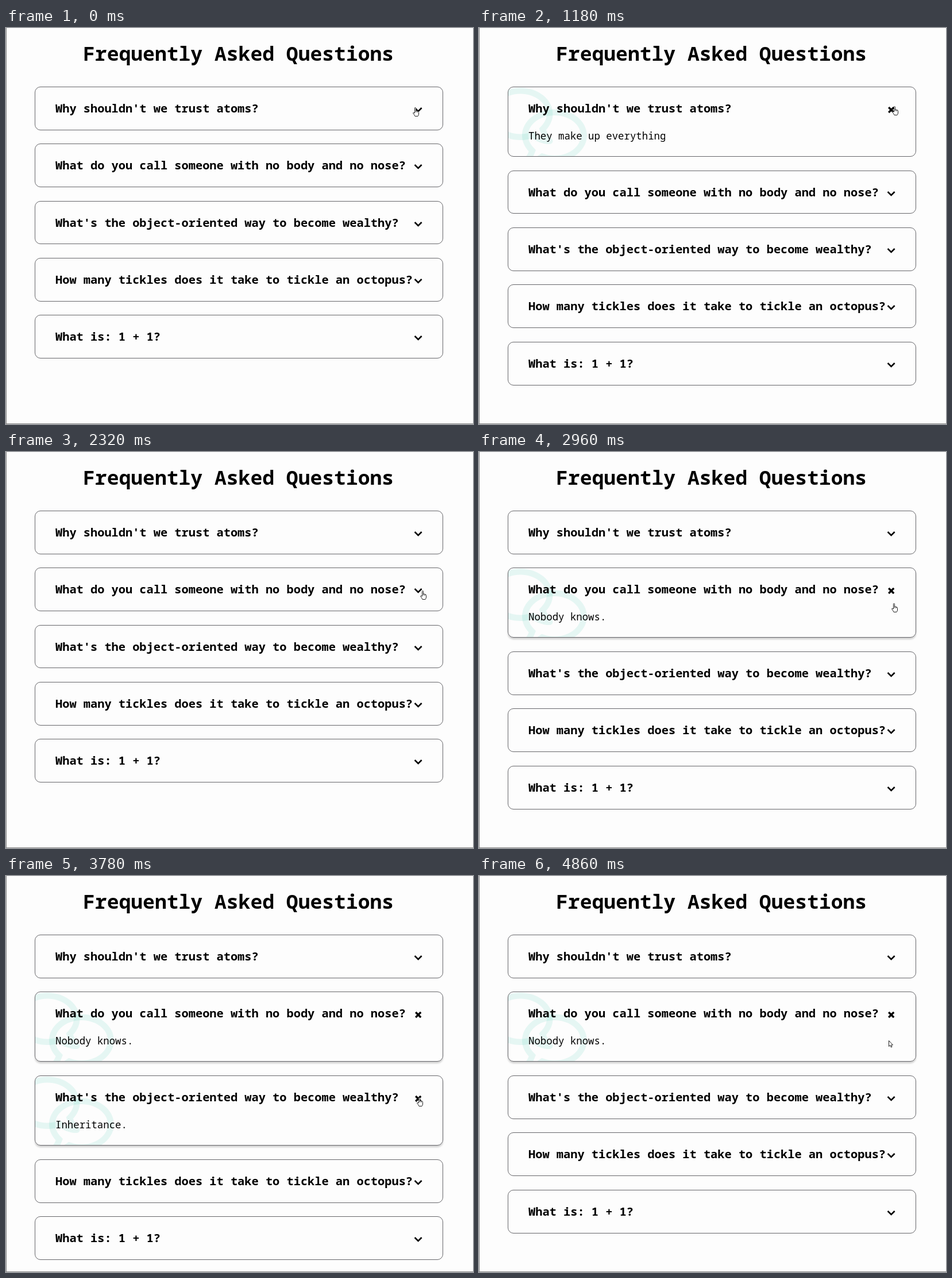
These frames come from a looping animation (813 by 689 pixels, 4.96 s). An HTML page:

```html
<!DOCTYPE html>
<html lang="en">
<head>
<meta charset="utf-8">
<title>Frequently Asked Questions</title>
<style>
  html, body { margin: 0; width: 100%; height: 100%; overflow: hidden; background: #fdfdfd; }
  #stage { position: absolute; inset: 0; box-sizing: border-box; border: solid #858585; border-width: 0 0 1px 1px; }
  svg { position: absolute; overflow: visible; }
  text { font-family: "Noto Sans Mono", monospace; white-space: pre; }
  .title { font-size: 34.7px; font-weight: 700; }
  .question { font-size: 20.33px; font-weight: 700; }
  .answer { font-size: 17.35px; }
  .card { position: absolute; left: 50px; width: 711px; box-sizing: border-box;
    border: 1px solid #66666a; border-radius: 10px; overflow: hidden; }
  .card svg { left: -1px; top: -1px; }
  .bubbles { fill: #1abc9c; opacity: .1; }
  .icon { fill: none; stroke: #000; }
  #cursor { left: 0; top: 0; fill: #fff; stroke: #222; stroke-width: 1; stroke-linejoin: round; }
</style>
</head>
<body>
<div id="stage"></div>
<svg width="813" height="80" style="left:0;top:0"><text class="title" x="134" y="57">Frequently Asked Questions</text></svg>
<div id="cards"></div>
<svg id="cursor" width="20" height="20">
  <path id="hand" d="M3.5 10V1.5Q3.5 .5 4.5 .5T5.5 1.5V6Q7.9 5.3 8 6.8Q10.4 6.3 10.5 8.5V12Q10.2 14 9 15.5H4Q3 13 .6 10Q.9 8 3.5 10ZM5.5 6V8.5M8 6.8V9"/>
  <path id="arrow" d="M.5 .5V10.5L2.8 8.5 4.4 12 6 11.3 4.5 8H7.5Z"/>
</svg>
<script>
const LOOP = 4960, FADE = 140;
const TOP = 101.8, CLOSED = 75.8, PITCH = 99.4, EXTRA = 46.4;

// open: the time span in which a card shows its answer
const items = [
  { question: "Why shouldn't we trust atoms?", answer: "They make up everything", open: [1180, 1870] },
  { question: "What do you call someone with no body and no nose?", answer: "Nobody knows.", open: [2500, LOOP] },
  { question: "What's the object-oriented way to become wealthy?", answer: "Inheritance.", open: [3510, 4670] },
  { question: "How many tickles does it take to tickle an octopus?" },
  { question: "What is: 1 + 1?" }
];

const BUBBLE = "M256 32C114.6 32 0 125.1 0 240c0 47.6 19.9 91.2 52.9 126.3C38 405.7 7 439.1 6.5 439.5" +
  "c-6.6 7-8.4 17.2-4.6 26S14.4 480 24 480c61.5 0 110-25.7 139.1-46.3C192 442.8 223.2 448 256 448" +
  "c141.4 0 256-93.1 256-208S397.4 32 256 32zm0 368c-26.7 0-53.1-4.1-78.4-12.1l-22.7-7.2-19.5 13.8" +
  "c-14.3 10.1-33.9 21.4-57.5 29 7.3-12.1 14.4-25.7 19.9-40.2l10.6-28.1-20.6-21.8" +
  "C69.7 314.1 48 282.2 48 240c0-88.2 93.3-160 208-160s208 71.8 208 160-93.3 160-208 160z";

const clamp = x => Math.min(1, Math.max(0, x));
const linear = x => x;
const easeOut = x => 1 - (1 - x) ** 2;
const easeInOut = x => x * x * (3 - 2 * x);

// Each move ends at x, y; equal times make a jump.
const moves = [
  { from: 30, to: 30, x: 705, y: 136, ease: linear },
  { from: 300, to: 380, x: 719, y: 136, ease: linear },
  { from: 1890, to: 2320, x: 721, y: 241, ease: easeInOut },
  { from: 2960, to: 2960, x: 718, y: 263, ease: linear },
  { from: 2960, to: 3480, x: 715, y: 382, ease: easeOut },
  { from: 3510, to: 3780, x: 715, y: 385, ease: linear },
  { from: 4670, to: 4860, x: 713, y: 286, ease: easeInOut }
];

function cursorAt(t) {
  let x = 708, y = 138;
  for (const m of moves) {
    if (t < m.from) break;
    const k = m.to > m.from ? m.ease(clamp((t - m.from) / (m.to - m.from))) : 1;
    x += (m.x - x) * k;
    y += (m.y - y) * k;
  }
  return { x: Math.round(x), y: Math.round(y) };
}

const byId = id => document.getElementById(id);

for (const item of items) {
  const card = document.createElement("div");
  card.className = "card";
  card.innerHTML = `<svg width="711" height="123">
    <g class="details">
      <path class="bubbles" d="${BUBBLE}" transform="translate(78.5 -5) scale(-.2205 .2188)"/>
      <path class="bubbles" d="${BUBBLE}" transform="translate(25 32.5) scale(.2205 .2188)"/>
      <text class="answer" x="36" y="92.2">${item.answer || ""}</text>
      <path class="icon" stroke-width="3.3" d="M663.2 36l9 9m0-9l-9 9"/>
    </g>
    <path class="icon chevron" stroke-width="2.6" d="M661.6 37l6 6 6-6"/>
    <text class="question" x="36" y="45.2">${item.question}</text></svg>`;
  byId("cards").append(card);
  item.card = card;
  item.details = card.querySelector(".details");
  item.chevron = card.querySelector(".chevron");
}

const show = (element, visible) => { element.style.display = visible ? "" : "none"; };

function draw(t) {
  const cursor = cursorAt(t);
  let top = TOP, overButton = false;
  for (const { card, details, chevron, open: [start, end] = [LOOP, LOOP] } of items) {
    const isOpen = t >= start && t < end;
    const shadow = clamp((t - start) / FADE) * (1 - clamp((t - end) / FADE));
    const y = Math.round(top), bottom = Math.round(top + CLOSED + (isOpen ? EXTRA : 0));
    card.style.top = y + "px";
    card.style.height = bottom - y + "px";
    card.style.boxShadow = shadow ? `0 3px 3px rgba(0,0,0,${0.18 * shadow})` : "none";
    show(details, isOpen);
    show(chevron, !isOpen);
    if (Math.abs(cursor.y - top - 40) < 25) overButton = true;
    top += PITCH + (isOpen ? EXTRA : 0);
  }
  byId("cursor").style.transform = `translate(${cursor.x}px, ${cursor.y}px)`;
  show(byId("hand"), overButton);
  show(byId("arrow"), !overButton);
}

const began = performance.now();
function tick() {
  draw((performance.now() - began) % LOOP);
  requestAnimationFrame(tick);
}
tick();
</script>
</body>
</html>
```
